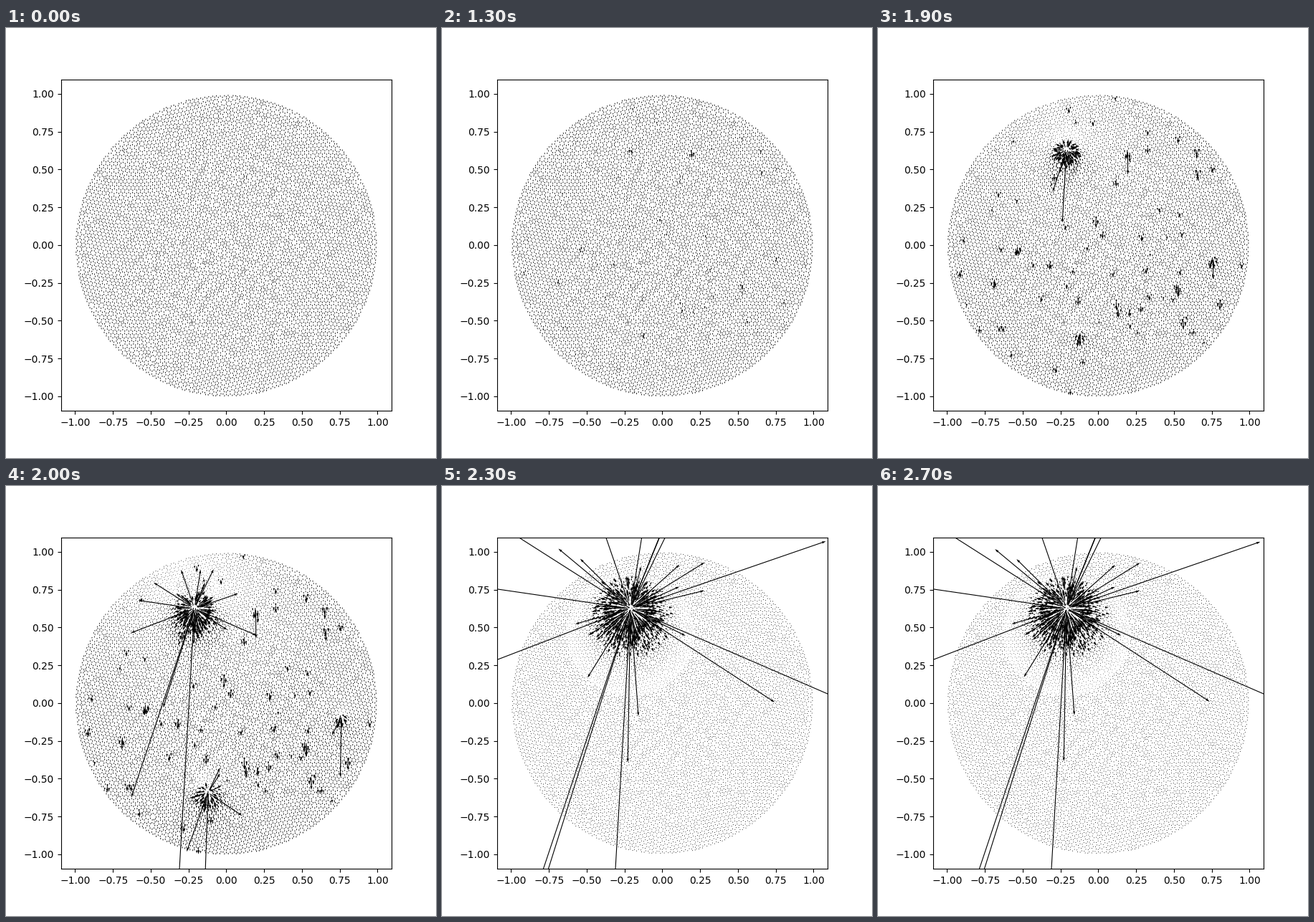
Write a matplotlib script that moves like this. It is 600 px wide and 600 px high and loops after 2800 ms.

```python
import numpy as np
import matplotlib.pyplot as plt
from matplotlib.animation import FuncAnimation
from matplotlib.tri import Triangulation

FRAMES, STEP_MS = 28, 100
BLAST = 21                       # frame at which the main burst is full
rng = np.random.default_rng(7)


def disc_mesh(h=0.0262):
    """Cell centres of an unstructured triangle mesh on the unit disc."""
    n = int(1.4 / h)
    i, j = np.meshgrid(np.arange(-n, n + 1), np.arange(-n, n + 1))
    x = (h * (i + 0.5 * (j % 2))).ravel()
    y = (h * 0.866 * j).ravel()
    x = x + 0.12 * np.sin(2.5 * y)
    y = y + 0.12 * np.sin(2.5 * x)
    pts = np.column_stack([x, y])
    pts = pts[np.hypot(x, y) < 1 - 0.6 * h]
    pts += rng.normal(0, 0.2 * h, pts.shape)
    t = np.linspace(0, 2 * np.pi, round(2 * np.pi / h), endpoint=False)
    rim = np.column_stack([np.cos(t), np.sin(t)])
    inner = len(pts)
    pts = np.vstack([pts, rim])
    for _ in range(2):
        a, b = Triangulation(*pts.T).edges.T
        total, count = np.zeros_like(pts), np.zeros(len(pts))
        for p, q in ((a, b), (b, a)):
            np.add.at(total, p, pts[q])
            np.add.at(count, p, 1)
        pts[:inner] = (total / count[:, None])[:inner]
    return pts[Triangulation(*pts.T).triangles].mean(axis=1)


def growth(f):
    """Exponential rise, slight overshoot, then settling at 1."""
    if f < BLAST:
        return np.exp(1.55 * (f - BLAST)) if f > BLAST - 4 else 0
    return 1 + 0.06 * np.exp(BLAST - f)


def pulse(peak, width):
    def level(f):
        v = np.exp(-((f - peak) / width) ** 2)
        return v if v > 0.01 else 0
    return level


class Burst:
    """Radial push from one centre, with a few long rays of its own."""

    def __init__(self, centre, strength, level, rays, extra=0, span=(1, 1)):
        self.centre = np.array(centre)
        self.strength, self.level = strength, level
        angles = np.r_[list(rays), rng.uniform(0, 360, extra)]
        self.length = np.r_[list(rays.values()), np.geomspace(*span, extra)]
        a = np.radians(angles)
        self.dirs = np.column_stack([np.cos(a), np.sin(a)])
        near = np.sqrt(strength / self.length)
        self.roots = self.centre + self.dirs * near[:, None]
        self.tips = self.length - near

    def push(self, f):
        k = self.strength * self.level(f) ** 0.7
        if not k:
            return 0
        d = cells - self.centre
        r = np.hypot(*d.T) + 1e-6
        k = k * (1 - 0.4 * d[:, 1] / r)
        size = k * r / (r ** 3 + 0.5 * k)
        size = np.where(size > 2, size * jitter, size)
        return d / r[:, None] * size[:, None]

    def rays(self, f):
        reach = self.level(f) or np.nan
        return self.dirs * (self.tips * reach)[:, None]


# Lengths are in pixels, measured from the middle of the disc, y upwards.
UNIT = 211.0
cells = disc_mesh() * UNIT
jitter = np.exp(rng.normal(0, 0.45, len(cells)))

bursts = [
    Burst((-44.5, 132), 6500, growth,
          {19: 286, 64: 270, 81: 240, 109: 250, 147.5: 300, 171.7: 357,
           201: 433, 251.5: 1300, 252.5: 670, 266.7: 2200, 269: 213,
           327: 238, 336.6: 433}, 15, (60, 160)),
    Burst((-25.5, -125), 700, pulse(20.45, 0.85),
          {250: 115, 326: 75, 268: 240}, 6, (18, 50)),
    Burst((160.5, -19), 100, pulse(20, 0.95), {269: 84, 243: 29}),
]

# Spots where the fall speeds up: the burst centres, two more, and small ones
strong = [b.centre for b in bursts] + [(-112.5, -5), (110.5, -57)]
weak = cells[rng.choice(len(cells), 70, replace=False)]
gains = np.r_[np.full(len(strong), 9.0), 1 + rng.exponential(2, len(weak))]
spots = sum(g * np.exp(-((cells - s) ** 2).sum(axis=1) / 9)
            for s, g in zip([*strong, *weak], gains))
near_main = np.exp(-((cells - bursts[0].centre) ** 2).sum(axis=1) / 110 ** 2)


def fall(f):
    """Downward speed of the cells."""
    if f >= BLAST:
        return np.full(len(cells), 0.5)
    speed = 2.4 * (1 - 0.8 * near_main * np.sqrt(growth(f)))
    if f >= 5:
        speed = speed + spots * np.exp(0.27 * (max(f, 6) - 17))
    return speed


def field(f):
    flow = np.column_stack([np.zeros(len(cells)), -fall(f)])
    flow = flow + sum(b.push(f) for b in bursts)
    return np.vstack([flow] + [b.rays(f) for b in bursts])


fig, ax = plt.subplots(figsize=(6, 6), dpi=100)
ax.set_aspect("equal")
pos = np.vstack([cells] + [b.roots for b in bursts]) / UNIT
arrows = ax.quiver(*pos.T, *field(0).T, scale=1, scale_units="dots",
                   width=0.0024)
ax.set_xlim(-1.0942, 1.0947)
ax.set_ylim(-1.0949, 1.0947)


def update(f):
    arrows.set_UVC(*field(f).T)
    return (arrows,)


anim = FuncAnimation(fig, update, frames=FRAMES, interval=STEP_MS)
plt.show()
```
